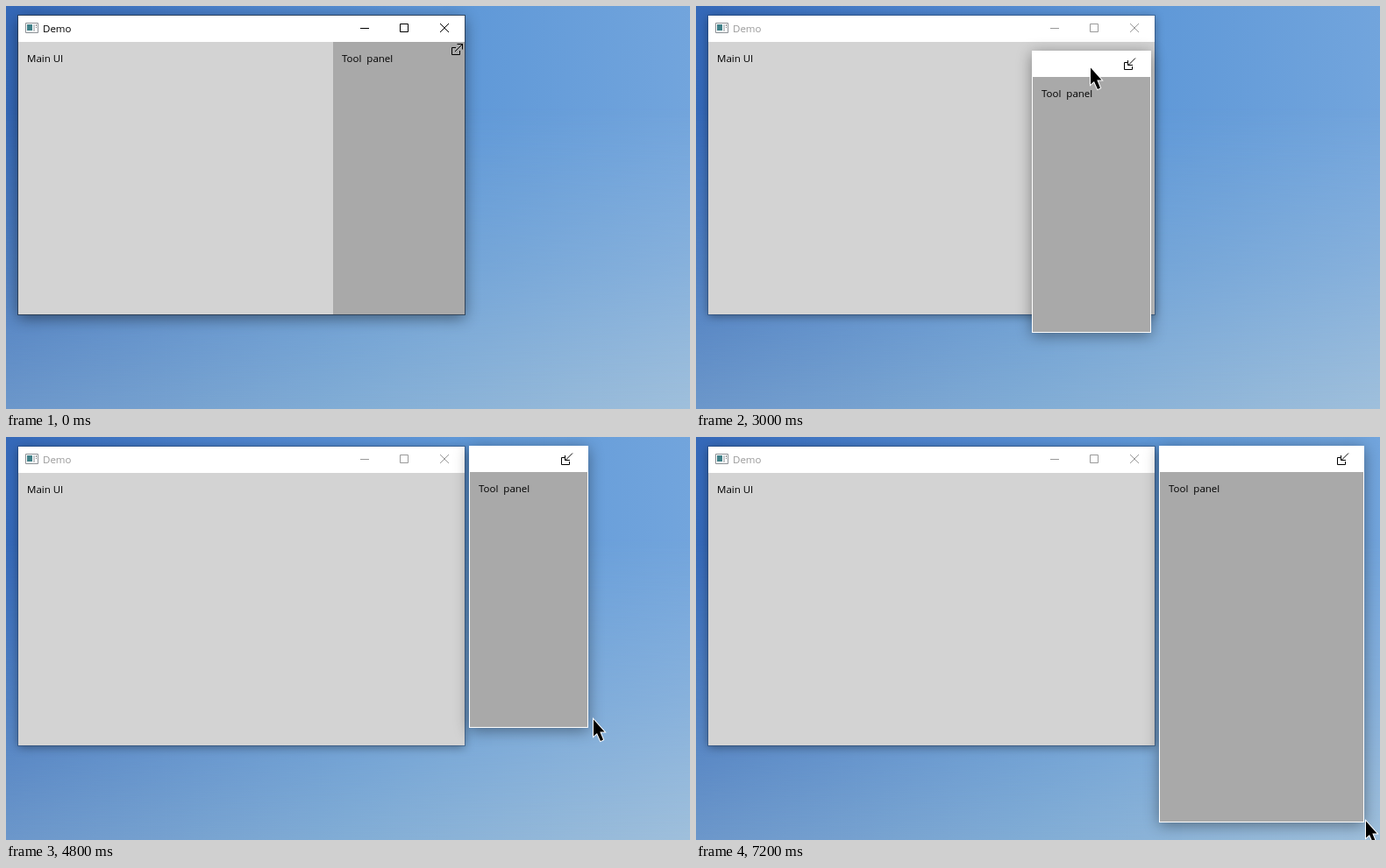
An HTML page that plays this animation: 780 by 460 pixels, repeating every 8 s.

```html
<!DOCTYPE html>
<html lang="en">
<head>
<meta charset="utf-8">
<title>Detachable tool panel</title>
<style>
  html, body { margin: 0; width: 100%; height: 100%; overflow: hidden; }
  body { position: relative; font: 11.5px/16px "Open Sans", sans-serif; }
  #desk, #desk::after { position: absolute; inset: 0; }
  #desk { background: linear-gradient(94deg, #3468b8, #4a80ca 30%, #6099d8 66%, #74a6dd); }
  #desk::after {
    content: ""; background: linear-gradient(90deg, #6c97ca, #82add5 50%, #9fbfdb);
    mask-image: linear-gradient(transparent 25%, #0007 65%, #000);
  }
  svg, #popup, #popup * { position: absolute; }
  text, #popup span { white-space: pre; }
  .line { fill: none; stroke: currentColor; }

  #main { left: 14px; top: 11px; color: #000; box-shadow: 0 0 0 1px #26364acc, 0 4px 16px #0007; }
  #main.inactive { color: #999; box-shadow: 0 0 0 1px #1e3c6470, 0 2px 10px #0006; }
  #main.inactive #panel { display: none; }

  #popup { box-sizing: border-box; border: 1px solid #fff; background: #a9a9a9; box-shadow: 0 3px 16px #0006; }
  #popup div { left: 0; right: 0; top: 0; height: 29px; background: #fff; }
  #popup span { left: 10px; top: 40px; }
  #popup svg { right: 16px; top: 7px; }

  #pointer { left: 0; top: 0; overflow: visible; }
  #pointer path { stroke: #fff; stroke-width: 2; paint-order: stroke; }
</style>
</head>
<body>
<div id="desk"></div>

<svg id="main" width="509" height="341" viewBox="14 11 509 341">
  <path fill="#fff" d="M14 11h509v30H14z"/>
  <path fill="#d3d3d3" d="M14 41h509v311H14z"/>
  <path fill="#fff" stroke="#8a8f94" d="M22.5 19.5h14v11h-14z"/>
  <path fill="#3f8088" d="M24 21h6v7h-6z"/>
  <path fill="#c4c8cc" d="M31 21h2v8h-2z"/>
  <path fill="#777" d="M34 21h1v2h-1zM34 24h1v1h-1z"/>
  <text x="42" y="30" fill="currentColor">Demo</text>
  <path class="line" d="M404 25.5h10M449.5 20.5h9v9h-9zM495 20l10 10M505 20l-10 10"/>
  <text x="24" y="64">Main UI</text>
  <g id="panel">
    <path fill="#a9a9a9" d="M373 41h150v311H373z"/>
    <text id="label" x="383" y="64">Tool  panel</text>
    <path class="line" d="M513 47.5h-4.5v8h9v-4.5M512 52l8.5-8.5M514.5 43.5h6v6"/>
  </g>
</svg>

<div id="popup">
  <div></div>
  <span>Tool  panel</span>
  <svg width="14" height="14"><path class="line" d="M4 5.5H.5v8h9V10M13 .5l-8 8M4.5 3v5.5H10"/></svg>
</div>

<svg id="pointer" width="1" height="1"><path/></svg>

<script>
const LOOP = 8000, STEP = 200;
const ARROW = 'M1 1.5V20.5L5 17L9 26L12 24.600L8.300 15.500H13.500Z';
const RESIZE = 'M-7 -7H-1.500L-3.600 -5L5.500 4L7.500 2V7.500H2L4 5.500L-5 -3.600L-7 -1.500Z';

// Pointer stops: arrival time, x, y
const stops = [
  [1200, 470, 295], [2200, 510, 50], [2400, 510, 50],
  [3000, 449, 69], [3400, 567, 25], [3800, 594, 28],
  [4600, 678, 316], [4800, 669, 321], [5800, 662, 331],
  [6000, 728, 396], [7000, 760, 439], [7200, 763, 437]
];
const DRAG = [3000, 3800], RESIZING = [5800, 7000];

const byId = id => document.getElementById(id);
const [main, label, popup, pointer] = ['main', 'label', 'popup', 'pointer'].map(byId);
const cursor = pointer.firstElementChild;

const clamp = (v, [min, max]) => Math.min(max, Math.max(min, v));
const smooth = p => p * p * (3 - 2 * p);
const show = (element, visible) => element.style.visibility = visible ? 'visible' : 'hidden';

function pointerAt(time) {
  const t = clamp(time, [stops[0][0], stops.at(-1)[0]]);
  const i = stops.findIndex((stop, n) => n && stop[0] >= t);
  const [t0, x0, y0] = stops[i - 1], [t1, x1, y1] = stops[i];
  const p = smooth((t - t0) / (t1 - t0));
  return [x0 + (x1 - x0) * p, y0 + (y1 - y0) * p].map(Math.round);
}

function draw(now) {
  const t = Math.floor(now % LOOP / STEP) * STEP;
  const detached = t >= 2400;
  main.classList.toggle('inactive', detached);
  show(label, t < 2200);
  show(popup, detached);
  show(pointer, t >= 1200);

  // The popup follows the pointer while its title bar or its corner is held
  const [gripX, gripY] = pointerAt(clamp(t, DRAG));
  const [cornerX, cornerY] = pointerAt(clamp(t, RESIZING));
  popup.style.left = gripX - 66 + 'px';
  popup.style.top = gripY - 18 + 'px';
  popup.style.width = cornerX - 526 + 'px';
  popup.style.height = cornerY - 9 + 'px';

  const [x, y] = pointerAt(t);
  cursor.setAttribute('d', t >= 5200 && t < 7200 ? RESIZE : ARROW);
  cursor.setAttribute('transform', `translate(${x} ${y})`);
  requestAnimationFrame(draw);
}
requestAnimationFrame(draw);
</script>
</body>
</html>
```
